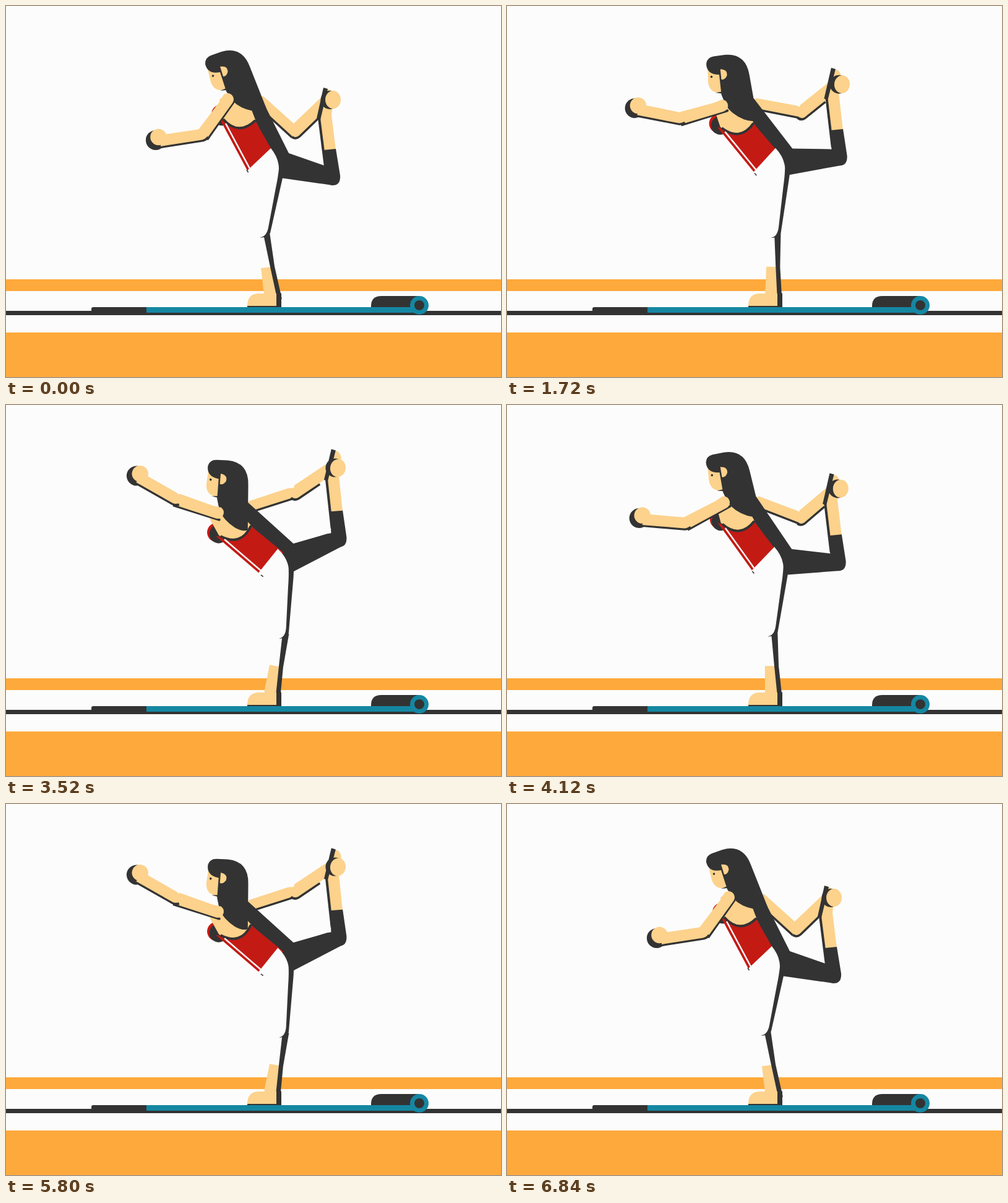
Recreate the animation shown at these times as an HTML page. Size 800 px wide and 600 px high, loop 6.88 s.

```html
<!DOCTYPE html>
<html lang="en">
<head>
<meta charset="utf-8">
<title>Standing bow stretch</title>
<style>
  html, body { margin: 0; width: 100%; height: 100%; overflow: hidden; background: #fcfcfc; }
  svg { display: block; width: 800px; height: 600px; }
  .d { fill: #333; }
  .s { fill: #fcd28c; }
  .r { fill: #c41a14; }
  .w { fill: #fcfcfc; }
  .o { fill: #fea93b; }
  .t { fill: #1587a2; }
  .l { fill: none; stroke: #333; stroke-width: 4; stroke-linejoin: round; }
</style>
</head>
<body>
<!-- data-turn: full swing in degrees and its pivot; data-move: full shift -->
<svg viewBox="0 0 800 600">
  <rect class="o" y="442" width="800" height="19"/>
  <rect class="o" y="528" width="800" height="72"/>
  <rect class="d" y="493" width="800" height="7"/>
  <path class="d" d="M138 495V490Q138 487 141 487H228V495Z"/>
  <rect class="t" x="227" y="487" width="443" height="9"/>
  <path class="d" d="M590 487V485Q590 469 607 469H668V487Z"/>
  <circle class="t" cx="668" cy="484" r="15"/>
  <circle class="d" cx="668" cy="484" r="8"/>

  <!-- far arm -->
  <g data-move="16 -8">
    <g data-turn="-21.5 440 255">
      <g data-turn="-39.5 416 149.2">
        <path class="l" d="M402 157L462 212"/>
        <path class="s" d="M416 146L466 191L475 206L464 212L402 155L406 147Z"/>
        <g data-turn="71 465 202">
          <path class="l" d="M462 212Q468 216 474 211L504 182"/>
          <path class="s" d="M464 191L508 149L522 162L503 181L473 210Q467 214 462 209Z"/>
        </g>
      </g>
    </g>
  </g>

  <!-- raised leg -->
  <g data-move="16.5 -6">
    <g data-turn="-36 440 259">
      <path class="d" d="M436 242L457 238L517 259L535 268L528 290L437 277Z"/>
      <g data-turn="37 528 277">
        <path class="s" d="M516 133L524 136Q530 141 529 150L526 176L533 233H513L506 182Z"/>
        <path class="d" d="M513 233L533 231L540 274Q541 290 528 290Q515 289 515 270Z"/>
        <path class="l" d="M506 181L516 260"/>
        <path class="d" d="M513 132L520 134L508 184L502 182Z"/>
      </g>
    </g>
  </g>

  <!-- standing leg -->
  <g data-turn="18.4 431 466">
    <path class="s" d="M412 424L428 422L437 466L434 476H420L417 466Z"/>
    <path class="d" d="M417 374L426 366L434 421L446 474L437 468L427 422Z"/>
    <g data-turn="-26.3 422 370">
      <path class="d" d="M432 240L452 250L447 278L427 367Q423 375 411 374.5Z"/>
    </g>
  </g>
  <path class="s" d="M390 486V483Q391 465 409 465H437V486Z"/>
  <path class="d" d="M390 485H437V464.500H445V487H390Z"/>

  <!-- torso -->
  <g data-move="16 -8">
    <g data-turn="-21.5 440 255">
      <circle class="r" cx="347.500" cy="175" r="15.500"/>
      <circle class="d" cx="349.500" cy="178.500" r="15"/>
      <path class="d" d="M385 150L411 146L421 166L457 238L448 264L430 240L403 186Z"/>
      <path class="r" d="M344 180L350 183L403 186L436 244L391 268Z"/>
      <path class="s" d="M345 151L362 140L392 155L403 184Q376 209 349 181Z"/>
      <path class="l" d="M351 183Q376 211 403 185"/>
      <path d="M355 190L394 263" fill="none" stroke="#fcfcfc" stroke-width="2.5"/>
    </g>
  </g>

  <!-- light trouser front -->
  <g data-turn="18.4 431 466">
    <g data-turn="-26.3 422 370">
      <path class="w" d="M390 266L428 230Q441 246 441 263Q440 275 436 294L424 358Q421 373 411 374H398Z"/>
    </g>
  </g>

  <g data-move="16 -8">
    <g data-turn="-21.5 440 255">
      <path class="l" style="stroke-width:1.5" d="M389 265L391.500 269"/>
      <!-- far hand holding the foot -->
      <g data-turn="-39.5 416 149.2">
        <g data-turn="71 465 202">
          <circle class="d" cx="523.500" cy="152" r="15"/>
          <ellipse class="s" cx="528.500" cy="151.500" rx="12.500" ry="14.500"/>
        </g>
      </g>
      <!-- head -->
      <g data-turn="44 378.5 146">
        <path class="s" d="M325 98L331 123Q336 136 347 136L357 134V98Z"/>
        <path class="d" d="M346 137L356 136V133Z"/>
        <path class="d" d="M322 94Q321 84 331 80L348 74Q381 64 394 98L421 166Q414 172 400 170Q378 166 366 153L356 138L346 107Q326 111 322 94Z"/>
        <path class="s" d="M346 98Q358 96 358.500 106Q357 114 351 114Z"/>
        <circle class="d" cx="334.500" cy="113" r="1.800"/>
      </g>
      <!-- near arm -->
      <g data-turn="94.8 361.8 149.4">
        <path class="l" d="M365 157L370 152L325 216"/>
        <path class="s" d="M352 143Q360 138 366 145Q370 151 366 157L325 214L313 210L311 200L345 155Z"/>
        <g data-turn="-34.3 318 209">
          <g data-turn="-20 247 212">
            <circle class="d" cx="242" cy="217" r="16"/>
            <circle class="s" cx="246.500" cy="212" r="13.200"/>
          </g>
          <path class="l" d="M248 228.500L318 217.500Q324 216 327 212"/>
          <path class="s" d="M314 199L326 204Q325 215 317 216.500L250 227L252 208.500Z"/>
        </g>
      </g>
    </g>
  </g>
</svg>
<script>
const LOOP = 6880, SWING = 2280, STEP = 40;
const read = key => [...document.querySelectorAll(`[data-${key}]`)]
  .map(el => [el, el.dataset[key].split(' ').map(Number)]);
const turns = read('turn'), moves = read('move');

function draw(now) {
  const t = Math.floor(now % LOOP / STEP) * STEP - STEP / 2;
  const p = (1 - Math.cos(2 * Math.PI * t / SWING)) / 2;
  for (const [el, [a, x, y]] of turns) el.setAttribute('transform', `rotate(${a * p} ${x} ${y})`);
  for (const [el, [x, y]] of moves) el.setAttribute('transform', `translate(${x * p} ${y * p})`);
}

const start = performance.now();
function tick() {
  draw(performance.now() - start);
  requestAnimationFrame(tick);
}
tick();
</script>
</body>
</html>
```
